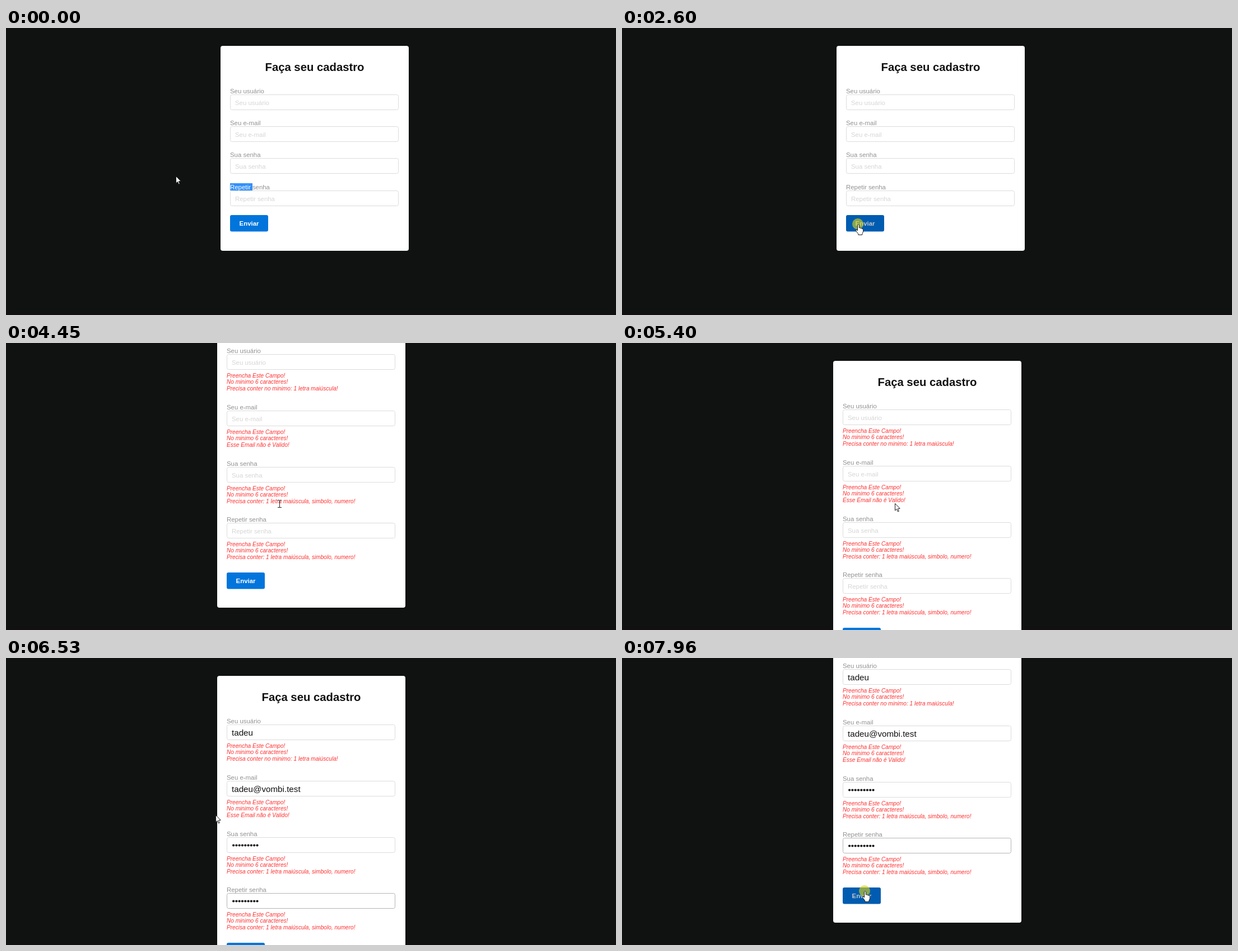
Animation, 1089 px wide and 514 px high, one loop 8 s. Source, as an HTML page with a canvas:

```html
<!DOCTYPE html>
<html lang="pt">
<head>
<meta charset="utf-8">
<title>Cadastro</title>
<style>
  html, body { margin: 0; width: 100%; height: 100%; overflow: hidden; background: #101211; }
  canvas { display: block; width: 1089px; height: 514px; }
</style>
</head>
<body>
<canvas id="stage" width="1089" height="514"></canvas>
<script>
const ctx = document.getElementById('stage').getContext('2d');
const LOOP = 8000;
const SANS = '"Liberation Sans", Arial, sans-serif';
const SMALL = '11.4px ' + SANS;

const EMPTY = 'Preencha Este Campo!';
const SHORT = 'No minimo 6 caracteres!';
const STRONG = 'Precisa conter: 1 letra maiúscula, simbolo, numero!';
const FIELDS = [
  { label: 'Seu usuário', value: 'tadeu', rule: 'Precisa conter no minimo: 1 letra maiúscula!' },
  { label: 'Seu e-mail', value: 'tadeu@vombi.test', rule: 'Esse Email não é Valido!' },
  { label: 'Sua senha', dots: 9, rule: STRONG },
  { label: 'Repetir senha', dots: 9, rule: STRONG }
];

// Pointer moves: start, end, number of steps, waypoints [x, y, shape]
const MOVES = [
  [0, 1, 1, [[303, 265, 'arrow'], [303, 265, 'arrow']]],
  [130, 400, 4, [[303, 265, 'arrow'], [386, 251, 'arrow']]],
  [600, 601, 1, [[384, 252, 'arrow'], [384, 252, 'arrow']]],
  [810, 1560, 11, [[384, 252, 'arrow'], [364, 242, 'arrow'], [364, 242, 'arrow'],
    [390, 246, 'arrow'], [440, 248, 'beam'], [493, 240, 'beam']]],
  [1630, 2390, 12, [[493, 240, 'beam'], [480, 188, 'beam'], [452, 215, 'arrow'],
    [428, 285, 'arrow'], [412, 340, 'hand'], [421, 351, 'hand']]],
  [2740, 3220, 8, [[421, 351, 'arrow'], [434, 270, 'beam'], [455, 177, 'beam']]],
  [3280, 3700, 7, [[455, 177, 'beam'], [474, 222, 'beam'], [490, 267, 'beam']]],
  [4170, 4450, 5, [[490, 267, 'beam'], [488, 288, 'beam']]],
  [5400, 5401, 1, [[487, 287, 'arrow'], [487, 287, 'arrow']]],
  [5670, 5671, 1, [[374, 281, 'arrow'], [374, 281, 'arrow']]],
  [7060, 7820, 11, [[374, 281, 'arrow'], [374, 281, 'arrow'], [392, 325, 'arrow'],
    [420, 390, 'arrow'], [433, 417, 'hand']]]
];

const within = (t, a, b) => t >= a && t < b;

function pointerAt(t) {
  const [start, end, steps, pts] = MOVES.filter(m => t >= m[0]).pop();
  const gap = (end - start) / Math.max(1, steps - 1);
  const done = Math.min(steps, Math.floor((t - start) / gap + 1e-6) + 1);
  const pos = done / steps * (pts.length - 1);
  const i = Math.min(Math.floor(pos), pts.length - 2);
  const f = pos - i, a = pts[i], b = pts[i + 1];
  return {
    x: Math.round(a[0] + (b[0] - a[0]) * f),
    y: Math.round(a[1] + (b[1] - a[1]) * f),
    shape: f === 1 ? b[2] : a[2]
  };
}

function text(str, x, y, font, color, align = 'left') {
  ctx.font = font;
  ctx.fillStyle = color;
  ctx.textAlign = align;
  ctx.fillText(str, x, y);
}

function box(x, y, w, h, r, fill, stroke) {
  ctx.beginPath();
  ctx.roundRect(x, y, w, h, r);
  ctx.fillStyle = fill;
  ctx.fill();
  if (stroke) {
    ctx.strokeStyle = stroke;
    ctx.lineWidth = 1;
    ctx.stroke();
  }
}

function disc(x, y, r, color) {
  ctx.beginPath();
  ctx.arc(x, y, r, 0, Math.PI * 2);
  ctx.fillStyle = color;
  ctx.fill();
}

function drawField(field, i, x, t, errors) {
  const top = Math.round(119.2 + i * (errors ? 100.75 : 57.1));
  const filled = t >= 5670;
  const last = i === 3;
  text(field.label, x, top - 2, SMALL, '#929292');
  if (last && t < 1090) {
    ctx.fillStyle = '#3390f8';
    ctx.fillRect(x, top - 13, 40, 13);
    text('Repetir', x, top - 2, SMALL, '#fff');
  }
  box(x + .5, top + .5, 300, 27, 3, '#fff', last && filled ? '#b4b4b4' : '#dcdcdc');

  if (!filled) {
    text(field.label, x + 9, top + 19, SMALL, '#d6d6d6');
  } else if (field.value) {
    text(field.value, x + 9, top + 20, '15.2px ' + SANS, '#111');
  } else {
    for (let k = 0; k < field.dots; k++) disc(x + 12.1 + k * 5.3, top + 14.5, 2.1, '#111');
    if (last && within(t, 6010, 6530)) {
      ctx.fillStyle = '#111';
      ctx.fillRect(x + 57, top + 6, 1, 17);
    }
  }

  if (errors) {
    [EMPTY, SHORT, field.rule].forEach((line, n) =>
      text(line, x, top + 41.5 + n * 11.75, 'italic 10.1px ' + SANS, '#ff3030'));
  }
}

function drawArrow() {
  ctx.beginPath();
  [[.5, .5], [.5, 13], [3.4, 10.4], [5.4, 15], [7.3, 14.2], [5.4, 9.8], [9.2, 9.4]]
    .forEach(([x, y]) => ctx.lineTo(x, y));
  ctx.closePath();
  ctx.fill();
  ctx.stroke();
}

function drawBeam() {
  ctx.fillStyle = '#222';
  ctx.fillRect(0, -6, 1, 13);
  for (const y of [-7, 6]) {
    ctx.fillRect(-3, y, 3, 1);
    ctx.fillRect(1, y, 3, 1);
  }
}

function drawHand() {
  ctx.fill(HAND);
  ctx.stroke(HAND);
}
const HAND = new Path2D('M-.5 1.6Q.9-.4 2.3 1.6V7Q3.7 5.9 4.8 7.6Q6.2 6.6 7.2 8.3' +
  'Q9.5 7.8 9.6 10.4V14L7.8 17.5V19.5H.8V17.6L-3.8 11.8Q-3.6 9.6-1.8 10.6L-.5 12Z');
const SHAPES = { arrow: drawArrow, beam: drawBeam, hand: drawHand };

function drawPointer({ x, y, shape }, clicked) {
  if (clicked) disc(x, y, 10, 'rgba(220, 212, 25, .62)');
  ctx.save();
  ctx.translate(x, y);
  ctx.fillStyle = '#fff';
  ctx.strokeStyle = '#1c1c1c';
  ctx.lineWidth = 1;
  ctx.lineJoin = 'round';
  SHAPES[shape]();
  ctx.restore();
}

function draw(t) {
  const errors = t >= 2740;
  const scrolled = within(t, 3840, 4870) || within(t, 5670, 6270) || t >= 7060;
  const pressed = within(t, 2530, 2740) || t >= 7890;
  const left = errors ? 377 : 383;
  const inner = left + 17;

  ctx.fillStyle = '#101211';
  ctx.fillRect(0, 0, 1089, 514);
  ctx.fillStyle = '#121011';
  ctx.fillRect(0, 510, 1089, 4);

  ctx.save();
  if (scrolled) ctx.translate(0, -99);
  box(left, 32, 336, errors ? 541 : 367, 4, '#fff');
  text('Faça seu cadastro', left + 168, 76.5, 'bold 20.3px ' + SANS, '#111', 'center');
  FIELDS.forEach((field, i) => drawField(field, i, inner, t, errors));
  const top = errors ? 510 : 335;
  box(inner, top, 68, 29.5, 3, pressed ? '#005cb0' : '#0275dc');
  text('Enviar', inner + 34, top + 19, 'bold 11.4px ' + SANS, pressed ? '#c3c7cb' : '#fff', 'center');
  ctx.restore();

  drawPointer(pointerAt(t), pressed || within(t, 960, 1100));
}

function loop(now) {
  draw(now % LOOP);
  requestAnimationFrame(loop);
}
draw(0);
requestAnimationFrame(loop);
</script>
</body>
</html>
```
